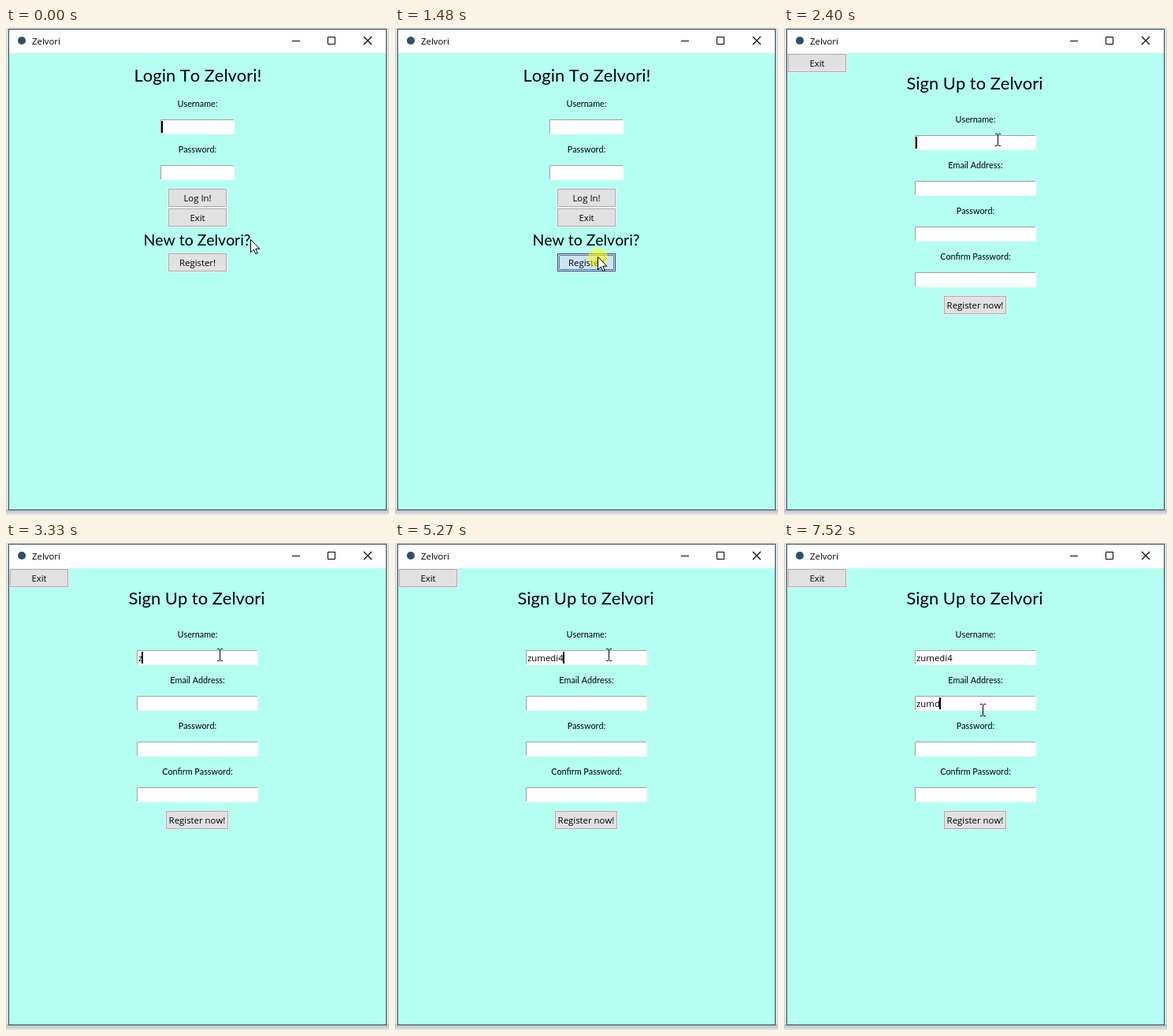
Write an HTML page that moves like this. It is 486x618 px and loops after 8 s.

```html
<!DOCTYPE html>
<html lang="en">
<head>
<meta charset="utf-8">
<title>Login window</title>
<style>
  html, body { margin: 0; width: 100%; height: 100%; overflow: hidden; }
  svg { display: block; width: 486px; height: 618px; }
  text { font: 11.4px "Open Sans", "Noto Sans", sans-serif; font-kerning: none; white-space: pre; }
  .mid { text-anchor: middle; }
  .title { font: 21.9px Lato, sans-serif; font-kerning: none; }
  .subtitle { font: 19.4px Lato, sans-serif; font-kerning: none; }
  .label { font: 10.8px Lato, sans-serif; font-kerning: none; }
</style>
</head>
<body>
<svg id="stage" viewBox="0 0 486 618"></svg>
<script>
const LOOP = 8000;
const APP = "Zelvori";
const ROW = 58; // distance between form fields
const $ = id => document.getElementById(id);

const text = (x, y, value, cls = "", id = "") =>
  `<text id="${id}" x="${x}" y="${y}" class="${cls}">${value}</text>`;

// Sunken entry box with its label: grey top and left edges
const field = (y, w, name) => {
  const x = 243 - w / 2;
  return `${text(243, y - 16, name, "mid label")}
    <rect x="${x}" y="${y}" width="${w}" height="19" fill="#fff"/>
    <path d="M${x + .5} ${y + 18}v-17.5h${w - 1.5}" fill="none" stroke="#a0a0a0"/>`;
};
const form = (y, w, names) => names.map((name, i) => field(y + ROW * i, w, name)).join("");

const button = (x, y, w, value, id = "") =>
  `<rect x="${x - 1}" y="${y - 1}" width="${w + 2}" height="25" fill="#f0f0f0"/>
   <rect id="${id}" x="${x + .5}" y="${y + .5}" width="${w - 1}" height="22" fill="#e1e1e1" stroke="#adadad"/>
   ${text(x + w / 2, y + 16, value, "mid")}`;

const frame = `
  <defs>
    <linearGradient id="shadow" x2="0" y2="1">
      <stop stop-color="#b4b8b9"/><stop offset="1" stop-color="#e6e8e9"/>
    </linearGradient>
  </defs>
  <rect width="486" height="618" fill="#d6dcdf"/>
  <rect y="611" width="486" height="7" fill="url(#shadow)"/>
  <rect x="3.5" y="1.5" width="479" height="610" fill="#b4fff1" stroke="#35484a"/>
  <rect x="4" y="2" width="478" height="30" fill="#fff"/>
  <circle cx="20" cy="16" r="5" fill="#2c5068"/>
  ${text(33, 21, APP)}
  <path d="M363 16.5h10M408.5 11.5h9v9h-9z" fill="none" stroke="#000"/>
  <path d="M454 11l10 10M464 11l-10 10" stroke="#000" stroke-width="1.2"/>`;

const login = `
  <g id="login">
    ${text(243.5, 68, `Login To ${APP}!`, "mid title")}
    ${form(116, 94, ["Username:", "Password:"])}
    ${button(206, 204, 74, "Log In!")}
    ${button(206, 229, 74, "Exit")}
    ${text(242.5, 276, `New to ${APP}?`, "mid subtitle")}
    ${button(206, 286, 74, "Register!", "register")}
    <g id="click">
      <rect x="208.5" y="288.5" width="69" height="18" fill="none" stroke="#000"
        stroke-dasharray="1" stroke-dashoffset=".5"/>
      <circle cx="257.5" cy="291.5" r="12.5" fill="#ff0" fill-opacity=".55"/>
    </g>
  </g>`;

const signup = `
  <g id="signup">
    ${button(5, 33, 74, "Exit")}
    ${text(242, 78, `Sign Up to ${APP}`, "mid title")}
    ${form(136, 154, ["Username:", "Email Address:", "Password:", "Confirm Password:"])}
    ${button(203, 340, 79, "Register now!")}
    ${text(168, 150, "", "", "user")}
    ${text(168, 150 + ROW, "", "", "mail")}
  </g>`;

const pointers = `
  <rect id="caret" width="2" height="15"/>
  <path id="arrow" d="M.5.5v16.2l3.8-3.6 2.5 5.6 2.4-1-2.5-5.5h5.1z" fill="#fff" stroke="#000"/>
  <path id="beam" d="M-3-7.5h2.5l1 1 1-1H4M-3 7.5h2.5l1-1 1 1H4M.5-7V7" fill="none" stroke="#000"/>`;

$("stage").innerHTML = frame + login + signup + pointers;

const show = (id, on) => $(id).setAttribute("display", on ? "inline" : "none");
const set = (id, attrs) => Object.entries(attrs).forEach(([k, v]) => $(id).setAttribute(k, v));
const clamp = v => Math.min(1, Math.max(0, v));
const ease = p => p * p * (3 - 2 * p);

const HOVER = 1230, PRESS = 1480, SIGNUP = 1540;

const STEP = 75;
const legs = [
  { from: 150, to: 225, x: 317, y: 266 },
  { from: 300, to: 460, x: 268, y: 284 },
  { from: 690, to: 760, x: 268, y: 278 },
  { from: 1160, to: HOVER, x: 257, y: 290 },
  { from: 1850, to: 2080, x: 271, y: 142 },
  { from: 5350, to: 5430, x: 252, y: 212 }
];

function mouseAt(t) {
  let x = 310, y = 268;
  for (const leg of legs) {
    if (t < leg.from) break;
    const steps = Math.round((leg.to - leg.from) / STEP) + 1;
    const done = t >= leg.to ? steps : Math.floor((t - leg.from) / STEP) + 1;
    const p = ease(clamp(done / steps));
    x += (leg.x - x) * p;
    y += (leg.y - y) * p;
  }
  return [Math.round(x), Math.round(y)];
}

// Typing starts slowly and speeds up; the last key falls at `to`
const typed = (value, from, to, t) => t < from ? "" :
  value.slice(0, 1 + Math.floor((value.length - 1) * clamp((t - from) / (to - from)) ** 1.43));

// The caret restarts its blink whenever a field gets the focus
const caretOn = (focus, t) => (t - focus) % 880 < 580;
const focuses = [
  { id: "", from: 50, until: PRESS, x: 197, y: 118 },
  { id: "user", from: 2400, until: 5700, x: 167, y: 138 },
  { id: "mail", from: 5750, until: LOOP, x: 167, y: 138 + ROW }
];

function render(t) {
  show("login", t < SIGNUP);
  show("signup", t >= SIGNUP);
  show("click", t >= PRESS);
  const [fill, stroke] = t < HOVER ? ["#e1e1e1", "#adadad"]
    : t < PRESS ? ["#e5f1fb", "#0078d7"] : ["#cce4f7", "#005499"];
  set("register", { fill, stroke });

  $("user").textContent = typed("zumedi4", 3330, 4580, t);
  $("mail").textContent = typed("zumd", 6510, 6990, t);

  const focus = focuses.find(f => t < f.until);
  const width = focus.id ? Math.round($(focus.id).getComputedTextLength()) : 0;
  set("caret", { x: focus.x + width, y: focus.y });
  show("caret", (!focus.id || t >= focus.from) && caretOn(focus.from, t));

  const [x, y] = mouseAt(t);
  const overField = t >= SIGNUP && y < 250 && (y - 136) % ROW < 20;
  show("arrow", !overField);
  show("beam", overField);
  set(overField ? "beam" : "arrow", { transform: `translate(${x} ${y})` });
}

const start = performance.now();
function tick() {
  render((performance.now() - start) % LOOP);
  requestAnimationFrame(tick);
}
tick();
</script>
</body>
</html>
```
